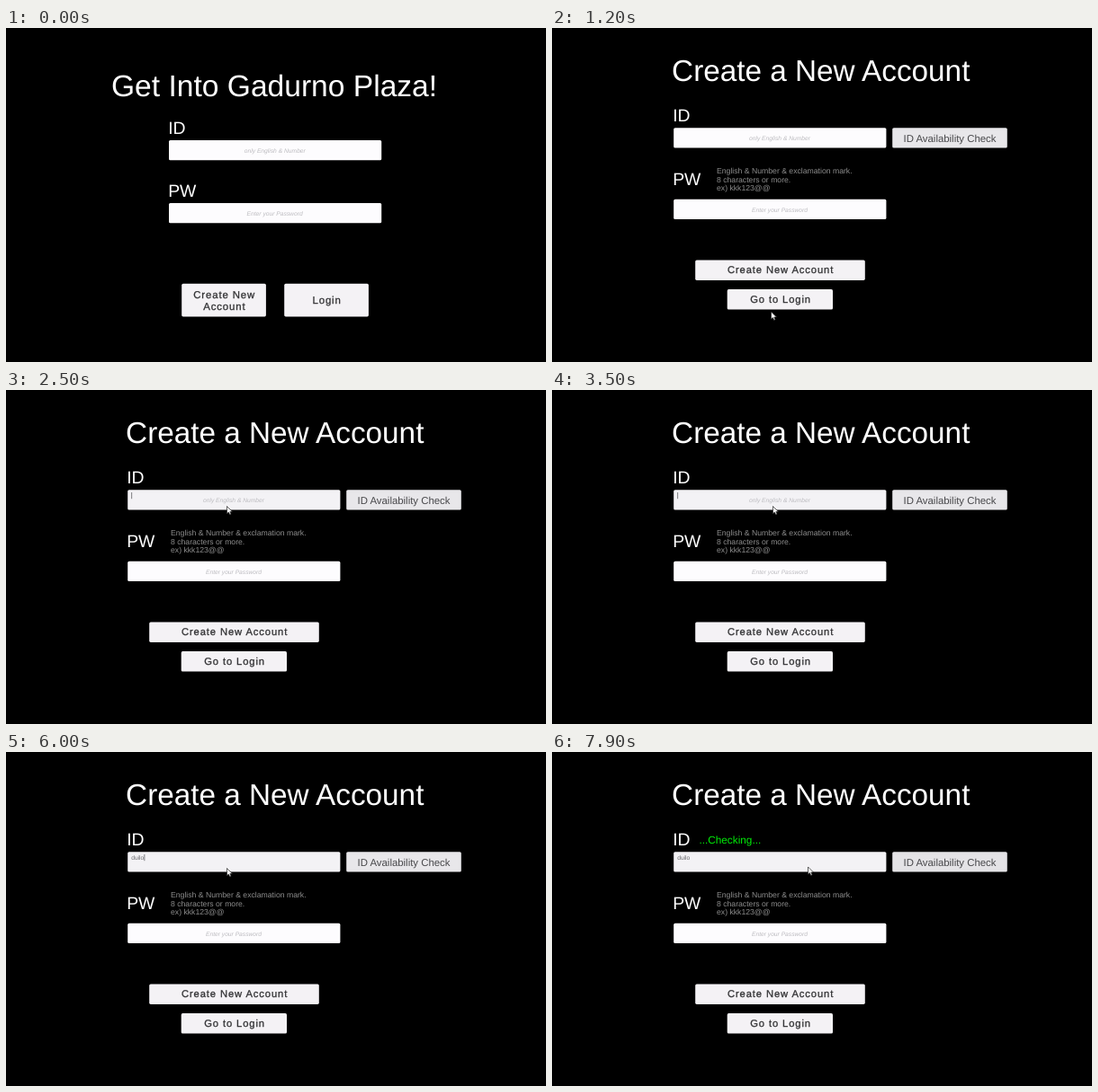
These frames come from a looping animation (600 px wide and 372 px high, 8000 ms). An HTML page:

```html
<!DOCTYPE html>
<html lang="en">
<head>
<meta charset="utf-8">
<title>Sign up form</title>
<style>
html, body { margin: 0; width: 100%; height: 100%; overflow: hidden; background: #000; }
svg { display: block; width: 100vw; height: 100vh; }
text { font-family: "Liberation Sans", Arial, sans-serif; fill: #fff; white-space: pre; text-rendering: geometricPrecision; }
.label { font-size: 19.4px; }
.hint { font-size: 6.7px; font-style: italic; fill: #bdbcc0; text-anchor: middle; }
.btn { font-size: 11.2px; letter-spacing: .9px; fill: #323234; stroke: #323234; stroke-width: .3px; text-anchor: middle; }
.big { font-size: 11.4px; letter-spacing: .88px; }
.check { font-size: 11.4px; fill: #48484b; text-anchor: middle; }
.help { font-size: 8.66px; fill: #8e8e8e; }
.typed { font-size: 6.7px; fill: #69696c; }
.status { font-size: 11.8px; fill: #00ee08; }
</style>
</head>
<body>
<svg viewBox="0 0 600 372" preserveAspectRatio="none">
  <g id="login"></g>
  <g id="signup"></g>
  <path id="cursor" d="M0 0V8.2L1.9 6.5 3.2 9.4 4.6 8.8 3.4 6H6Z" fill="#fff" stroke="#222" stroke-width=".7"/>
</svg>
<script>
const LOOP = 8000, STEP = 100;
const NAME = 'duilo', KEYS = [5300, 5500, 5700, 5900, 6000];
const FIELD = '#fdfcfe', FOCUS = '#f3f2f5', BUTTON = '#f4f2f5', PRESSED = '#cbc9cc';
const $ = id => document.getElementById(id);

function add(parent, tag, attrs, content = '') {
  const el = document.createElementNS('http://www.w3.org/2000/svg', tag);
  for (const k in attrs) el.setAttribute(k, attrs[k]);
  el.textContent = content;
  return parent.appendChild(el);
}
const box = (g, x, y, width, height, fill) => add(g, 'rect', { x, y, width, height, rx: 1.6, fill });
const text = (g, cls, x, y, s, size) =>
  add(g, 'text', size ? { class: cls, x, y, 'font-size': size } : { class: cls, x, y }, s);

const login = $('login'), signup = $('signup'), cursor = $('cursor');

text(login, 'title', 117, 76, 'Get Into Gadurno Plaza!', 33.6);
text(login, 'label', 180.2, 118, 'ID');
box(login, 181, 125, 236.2, 22.3, FIELD);
text(login, 'hint', 298.8, 138.6, 'only English & Number');
text(login, 'label', 180.2, 188, 'PW');
box(login, 181, 195, 236.2, 22.3, FIELD);
text(login, 'hint', 298.6, 208.8, 'Enter your Password');
const create = box(login, 195.2, 284.8, 93.7, 36.6, BUTTON);
text(login, 'btn big', 242.7, 300.6, 'Create New');
text(login, 'btn big', 242.9, 313.7, 'Account');
box(login, 309.2, 284.8, 93.7, 36.6, BUTTON);
text(login, 'btn big', 356.6, 307, 'Login');

text(signup, 'title', 133.1, 59.2, 'Create a New Account', 33.3);
text(signup, 'label', 134.2, 104.3, 'ID');
const status = text(signup, 'status', 163.4, 102, '...Checking...');
const idField = box(signup, 135.2, 111.2, 236.2, 22.4, FIELD);
const hint = text(signup, 'hint', 253, 125.2, 'only English & Number');
const typed = text(signup, 'typed', 139.2, 119.9, '');
const caret = add(signup, 'rect', { y: 114, width: .7, height: 7.2, fill: '#4c4c50' });
const check = box(signup, 378.2, 111.2, 127.6, 22.4, '#e8e7ea');
text(signup, 'check', 442, 126.7, 'ID Availability Check');
text(signup, 'label', 134.2, 175.1, 'PW');
['English & Number & exclamation mark.', '8 characters or more.', 'ex) kkk123@@']
  .forEach((s, i) => text(signup, 'help', 183, 161.6 + i * 9.9, s));
box(signup, 135.2, 190.8, 236.2, 22.3, FIELD);
text(signup, 'hint', 253, 204.5, 'Enter your Password');
box(signup, 159.2, 258.5, 188.6, 22.4, BUTTON);
text(signup, 'btn', 254.1, 273.4, 'Create New Account');
box(signup, 194.7, 291.1, 117.3, 22.4, BUTTON);
text(signup, 'btn', 254.1, 306, 'Go to Login');

// time, x, y
const PATH = [
  [200, 443, 87.5], [300, 281, 295], [400, 281, 295], [700, 252, 322], [900, 243.5, 316],
  [1400, 243.5, 316], [2300, 245.5, 129.5], [6500, 245.5, 129.5], [6800, 325, 133],
  [7200, 419, 121], [7600, 419, 121], [7900, 284.5, 128]
];

function cursorAt(t) {
  const i = PATH.findIndex(p => p[0] > t);
  if (i < 0) return PATH[PATH.length - 1].slice(1);
  const [t0, x0, y0] = PATH[i - 1], [t1, x1, y1] = PATH[i];
  const u = (t - t0) / (t1 - t0), e = u * u * (3 - 2 * u);
  return [x0 + (x1 - x0) * e, y0 + (y1 - y0) * e];
}

const show = (el, on) => el.setAttribute('visibility', on ? 'inherit' : 'hidden');
const within = (t, a, b) => t >= a && t < b;

function render(t) {
  const second = t >= 1200;
  show(login, !second);
  show(signup, second);
  create.setAttribute('fill', within(t, 1100, 1200) ? PRESSED : BUTTON);

  show(cursor, t >= 200);
  let y = 0;
  if (t >= 200) {
    const p = cursorAt(t);
    y = p[1];
    cursor.setAttribute('transform', `translate(${p})`);
  }

  const hover = second && y < 134;
  idField.setAttribute('fill', within(t, 2300, 2500) ? PRESSED : hover ? FOCUS : FIELD);
  check.setAttribute('fill', within(t, 7300, 7500) ? '#bfbec1' : t >= 7500 ? '#e4e3e6' : '#e8e7ea');

  const count = KEYS.filter(k => t >= k).length;
  typed.textContent = NAME.slice(0, count);
  show(hint, !count);
  const blink = within(t, 2500, 2900) || (t >= 2900 && Math.floor((t - 2900) / 600) % 2 === 1);
  show(caret, count ? t < 6600 : blink);
  caret.setAttribute('x', 139.4 + (count ? typed.getComputedTextLength() : 0));
  show(status, t >= 7400);
}

const start = performance.now();
function tick() {
  const t = (performance.now() - start) % LOOP;
  render(Math.floor(t / STEP) * STEP);
  requestAnimationFrame(tick);
}
tick();
</script>
</body>
</html>
```
